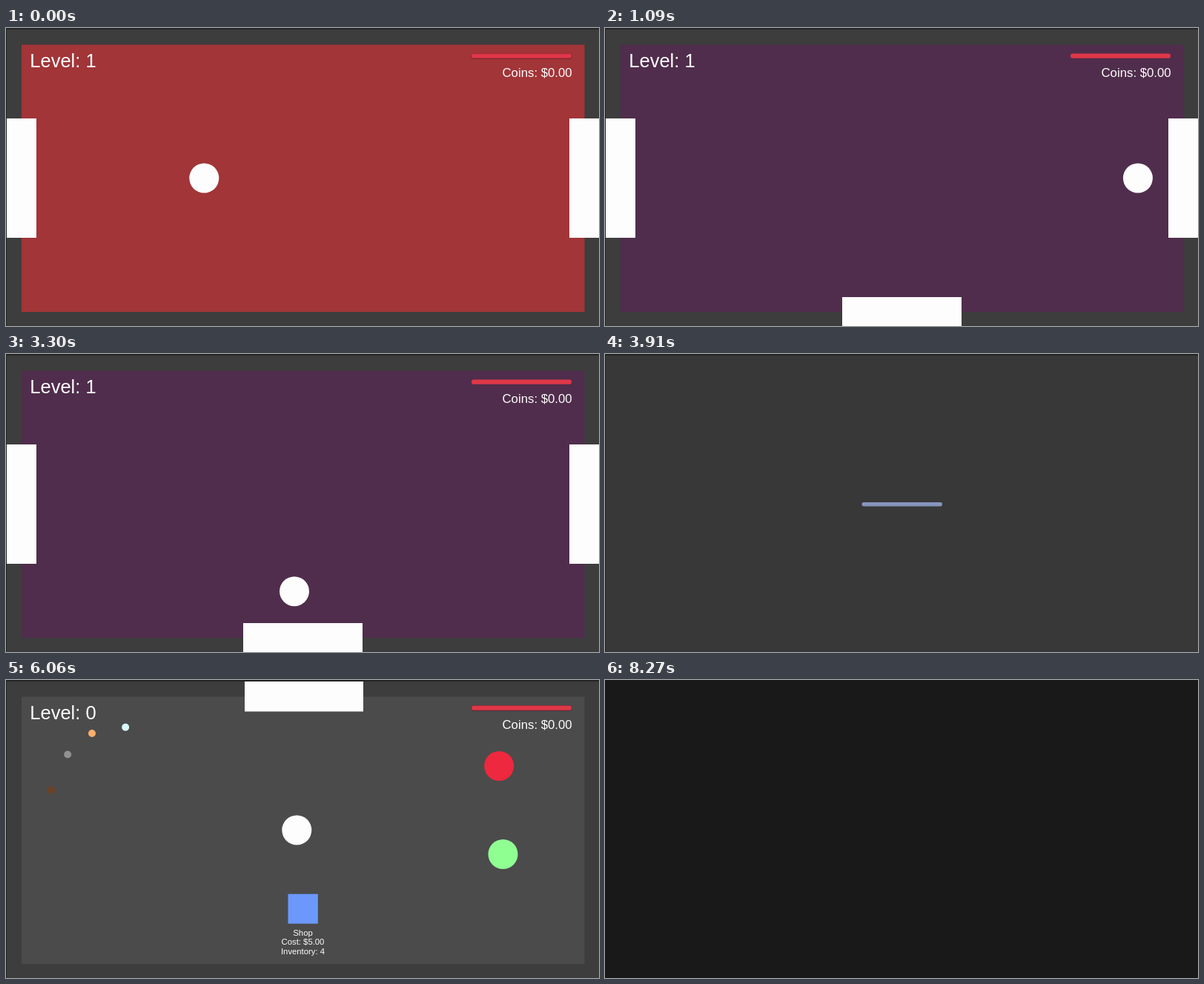
These frames come from a looping animation (800x402 px, 8.3 s). An HTML page with a canvas:

```html
<!DOCTYPE html>
<html lang="en">
<head>
<meta charset="utf-8">
<title>Ball rooms</title>
<style>
  html, body { margin: 0; width: 100%; height: 100%; overflow: hidden; background: #191919; }
  canvas { display: block; }
</style>
</head>
<body>
<canvas id="stage" width="800" height="402"></canvas>
<script>
const ctx = document.getElementById('stage').getContext('2d');
const LOOP = 8300;
const FONT = '"Liberation Sans", Arial, sans-serif';
const WHITE = '#fdfdfd';

const DOORS = {
  left: [1, 122, 40, 161],
  right: [760, 122, 40, 161],
  bottom: [320, 363, 161, 39],
  top: [322, 2, 160, 40.5]
};

// Ball paths: [time, x, y]
const ROOMS = {
  red: {
    floor: '#a13538', level: 1, doors: ['left', 'right'], barEdge: '#701f2a',
    path: [[0, 267.5, 202.5], [1060, 58.5, 202.5]]
  },
  purple: {
    floor: '#502d4c', level: 1, doors: ['left', 'right', 'bottom'],
    path: [[1060, 725, 202.5], [2690, 404, 202.5], [2767, 389, 217.7], [3420, 389, 343]]
  },
  hub: {
    floor: '#4b4b4b', level: 0, doors: ['top'], barEdge: '#5c2630', hub: true,
    path: [[4270, 400, 202.5], [5610, 400, 202.5], [5810, 439.5, 202.5],
           [6060, 392.5, 202.5], [6222, 360.5, 202.5], [6390, 360.5, 202.5],
           [6730, 360.5, 269], [7270, 360.5, 163.5]]
  }
};

function rect(color, x, y, w, h) {
  ctx.fillStyle = color;
  ctx.fillRect(x, y, w, h);
}

function disc(color, x, y, r) {
  ctx.fillStyle = color;
  ctx.beginPath();
  ctx.arc(x, y, r, 0, Math.PI * 2);
  ctx.fill();
}

function pill(color, x, y, w, h) {
  ctx.fillStyle = color;
  ctx.beginPath();
  ctx.roundRect(x, y, w, h, h / 2);
  ctx.fill();
}

function label(text, x, y, size, align = 'left') {
  ctx.font = `${size}px ${FONT}`;
  ctx.textAlign = align;
  ctx.fillStyle = WHITE;
  ctx.fillText(text, x, y);
}

function along(path, t) {
  let i = 1;
  while (i < path.length - 1 && t > path[i][0]) i++;
  const [t0, x0, y0] = path[i - 1];
  const [t1, x1, y1] = path[i];
  const k = Math.min(1, Math.max(0, (t - t0) / (t1 - t0)));
  return [x0 + (x1 - x0) * k, y0 + (y1 - y0) * k];
}

function backdrop(color) {
  rect(color, 0, 0, 800, 402);
  rect('#242424', 0, 0, 800, 2);
  rect('#242424', 0, 0, 1, 402);
}

function drawHub() {
  disc('#6d4123', 61, 148.5, 5);
  disc('#919191', 83.2, 100.5, 5);
  disc('#f8b06c', 116, 72, 5);
  disc('#d8f8fc', 161.2, 63.7, 5);
  disc('#ee283e', 665.2, 116, 20);
  disc('#90ff92', 670.5, 235, 20);
  rect('#6c98fc', 380.5, 288.7, 40.3, 40);
  label('Shop', 400.5, 344.8, 11.3, 'center');
  label('Cost: $5.00', 400.5, 357.4, 11.3, 'center');
  label('Inventory: 4', 400.5, 370, 11.3, 'center');
}

function drawRoom(room, t) {
  backdrop('#3d3d3d');
  rect(room.floor, 21, 22.5, 759.5, 360.5);
  for (const name of room.doors) rect(WHITE, ...DOORS[name]);
  if (room.hub) drawHub();
  disc(WHITE, ...along(room.path, t), 20);
  if (room.barEdge) pill(room.barEdge, 627.5, 34, 136, 7.8);
  pill('#de3748', 628, 34.6, 135, 6.2);
  label(`Level: ${room.level}`, 32.3, 53, 25.5);
  label('Coins: $0.00', 763.7, 65.6, 16.8, 'right');
}

function drawLoading(t) {
  const done = Math.min(1, (t - 3420) / 340);
  backdrop('#383838');
  pill('#8794bd', 346.5, 200, Math.max(5.4, 108.5 * done), 5.4);
}

function draw(t) {
  if (t < 1060) drawRoom(ROOMS.red, t);
  else if (t < 3420) drawRoom(ROOMS.purple, t);
  else if (t < 4270) drawLoading(t);
  else if (t < 8270) drawRoom(ROOMS.hub, t);
  else rect('#191919', 0, 0, 800, 402);
}

const start = performance.now();
function tick() {
  draw((performance.now() - start) % LOOP);
  requestAnimationFrame(tick);
}
tick();
</script>
</body>
</html>
```
